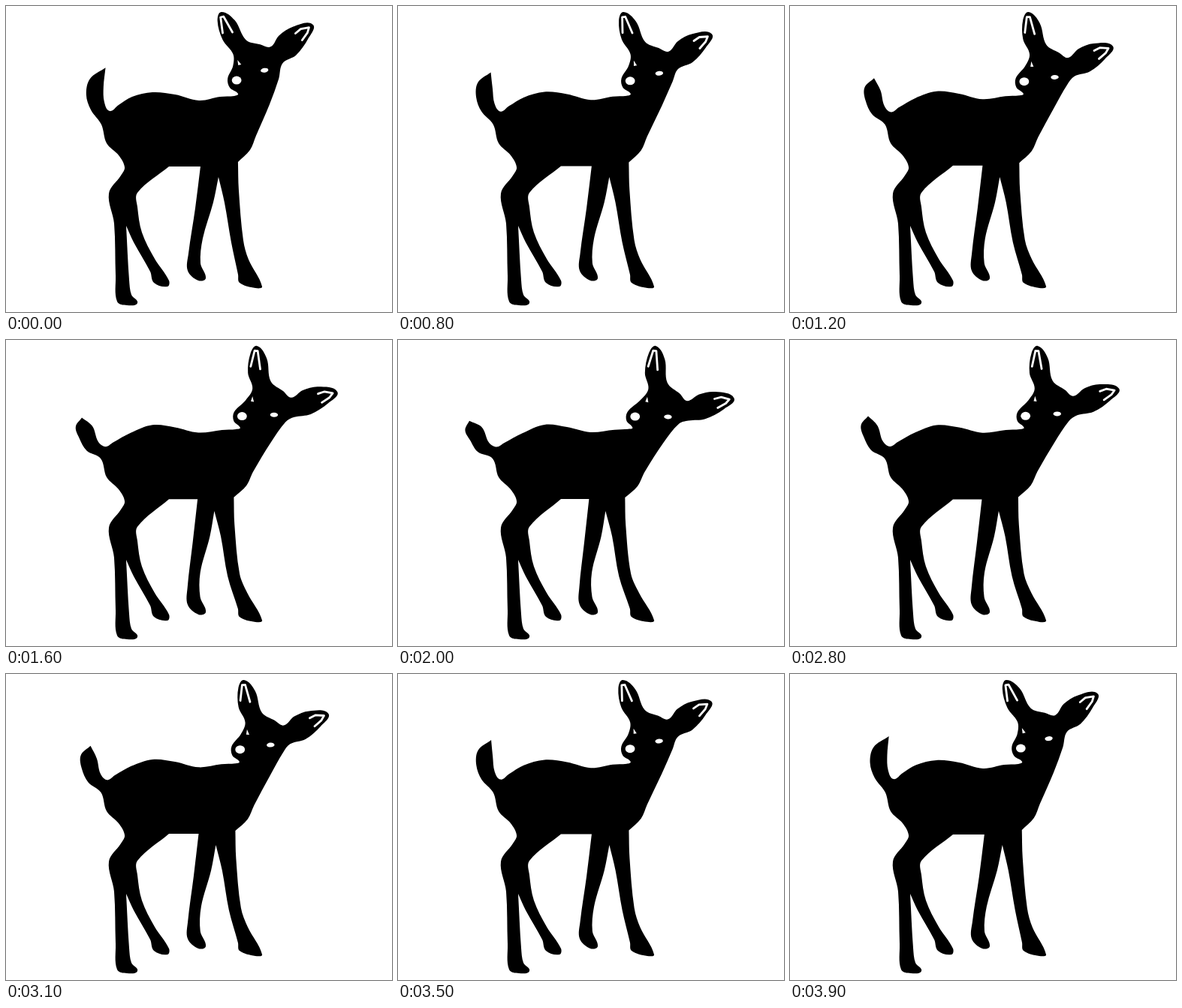
Write an HTML page with a canvas that moves like this. It is 514x408 px and loops after 4 s.

```html
<!DOCTYPE html>
<html lang="en">
<head>
<meta charset="utf-8">
<title>Fawn</title>
<style>
  html, body { margin: 0; height: 100%; overflow: hidden; background: #fff; }
  canvas { display: block; }
</style>
</head>
<body>
<canvas id="stage" width="514" height="408"></canvas>
<script>
const ctx = document.getElementById('stage').getContext('2d');
const LOOP = 4000, STEP = 100, DELAY = 140;
const parse = s => s.trim().split(/\s+/).map(p => p.split(',').map(Number));

// Upright silhouette, clockwise; a repeated point makes a sharp corner.
const tail = '127,158 113,138 107,118 112,97 133,82 133,82 130,108 131,128 138,140';
const back = '150,132 168,121 195,115 225,118 257,126 285,121 304,120';
const face = '309,117 298,109 295,97 302,80 302,64';
const leftEar = '288,45 281,20 286,8 304,19 319,45';
const rightEar = '338,51 352,54 363,39 382,27 408,24 402,43 386,65 368,76';
const neck = '363,97 351,131 333,173 325,192 309,208';
const frontLegs = `309,208 310,245 316,312 323,338 341,374 332,376 311,369 309,358 300,315
  291,262 283,228 283,228 276,262 262,310 259,343 266,363 256,366 242,353 243,330 252,270
  259,214 259,214`;
const hindLegs = `217,214 217,214 175,249 175,268 181,302 198,337 217,366 215,374 197,369
  192,354 170,315 160,293 160,293 164,365 167,385 175,396 161,399 148,394 146,360 144,290
  137,250 153,226 158,215 150,199 134,183`;
const fawn = parse([tail, back, face, leftEar, rightEar, neck, frontLegs, hindLegs].join(' '));

const earMarks = ['288,36 285,15 289,14 301,35', '385,36 392,30 403,28 401,35 394,45'].map(parse);
const farEye = parse('308,72 309,79 313,78');
const nose = [307, 99], nearEye = [344, 85.5];

// Pins that hold or pull the figure: x, y and travel at full lean.
const pins = parse(`133,82,-37,25 118,115,-12,12
  286,8,56,0 311,55,35,7 408,25,38,52 362,62,26,30 340,51,36,21
  310,76,21,4 307,99,8.5,3 344,85.5,15,16.5 309,118,3,0
  358,112,6,9 344,149,-2,3 333,178,-5,3 309,208,-6.5,2
  257,126,-1,-3 195,115,0,-2 217,214,0,-2 259,214,-4.5,-2 283,228,-6.5,0
  304,300,-6,0 257,300,-4,0 322,366,0,0 254,356,0,0
  128,165,0,0 157,207,0,0 148,245,0,0 175,255,0,0 170,315,0,0 205,365,0,0 160,388,0,0`);

// Moves a point by the rigid turn that best fits the nearby pins.
function bend([x, y], lean) {
  let sum = 0, px = 0, py = 0, qx = 0, qy = 0, cos = 0, sin = 0;
  const near = pins.map(([a, b, dx, dy]) => {
    const w = 1 / ((x - a) ** 2 + (y - b) ** 2 + 0.01) ** 2;
    const u = a + dx * lean, v = b + dy * lean;
    sum += w; px += w * a; py += w * b; qx += w * u; qy += w * v;
    return [w, a, b, u, v];
  });
  px /= sum; py /= sum; qx /= sum; qy /= sum;
  for (const [w, a, b, u, v] of near) {
    cos += w * ((a - px) * (u - qx) + (b - py) * (v - qy));
    sin += w * ((a - px) * (v - qy) - (b - py) * (u - qx));
  }
  const size = Math.hypot(cos, sin) || 1;
  cos /= size; sin /= size;
  return [qx + cos * (x - px) - sin * (y - py), qy + sin * (x - px) + cos * (y - py)];
}

function smoothShape(pts) {
  const at = i => pts[(i + pts.length) % pts.length];
  const handle = (p, from, to, reach) => {
    const k = reach / (Math.hypot(to[0] - from[0], to[1] - from[1]) || 1);
    return [p[0] + (to[0] - from[0]) * k, p[1] + (to[1] - from[1]) * k];
  };
  ctx.beginPath();
  ctx.moveTo(...pts[0]);
  pts.forEach((p, i) => {
    const q = at(i + 1), reach = Math.hypot(q[0] - p[0], q[1] - p[1]) / 3;
    ctx.bezierCurveTo(...handle(p, at(i - 1), q, reach), ...handle(q, at(i + 2), p, reach), ...q);
  });
  ctx.fill();
}

function line(pts) {
  ctx.beginPath();
  pts.forEach(p => ctx.lineTo(...p));
}

function oval([x, y], rx, ry, tilt = 0) {
  ctx.beginPath();
  ctx.ellipse(x, y, rx, ry, tilt, 0, Math.PI * 2);
  ctx.fill();
}

function draw(ms) {
  const t = Math.floor(ms % LOOP / STEP) * STEP;
  const lean = 0.52 * (1 - Math.cos((t - DELAY) / LOOP * Math.PI * 2));
  const pose = pts => pts.map(p => bend(p, lean));

  ctx.fillStyle = '#fff';
  ctx.fillRect(0, 0, 514, 408);
  ctx.fillStyle = '#000';
  smoothShape(pose(fawn));

  ctx.fillStyle = ctx.strokeStyle = '#fff';
  ctx.lineWidth = 2.8;
  ctx.lineCap = ctx.lineJoin = 'round';
  for (const mark of earMarks) {
    line(pose(mark));
    ctx.stroke();
  }
  line(pose(farEye));
  ctx.fill();
  oval(bend(nose, lean), 6.4, 5.5);
  oval(bend(nearEye, lean), 5.2, 3, 0.2 * lean - 0.15);
}

function tick() {
  draw(performance.now());
  requestAnimationFrame(tick);
}
tick();
</script>
</body>
</html>
```
